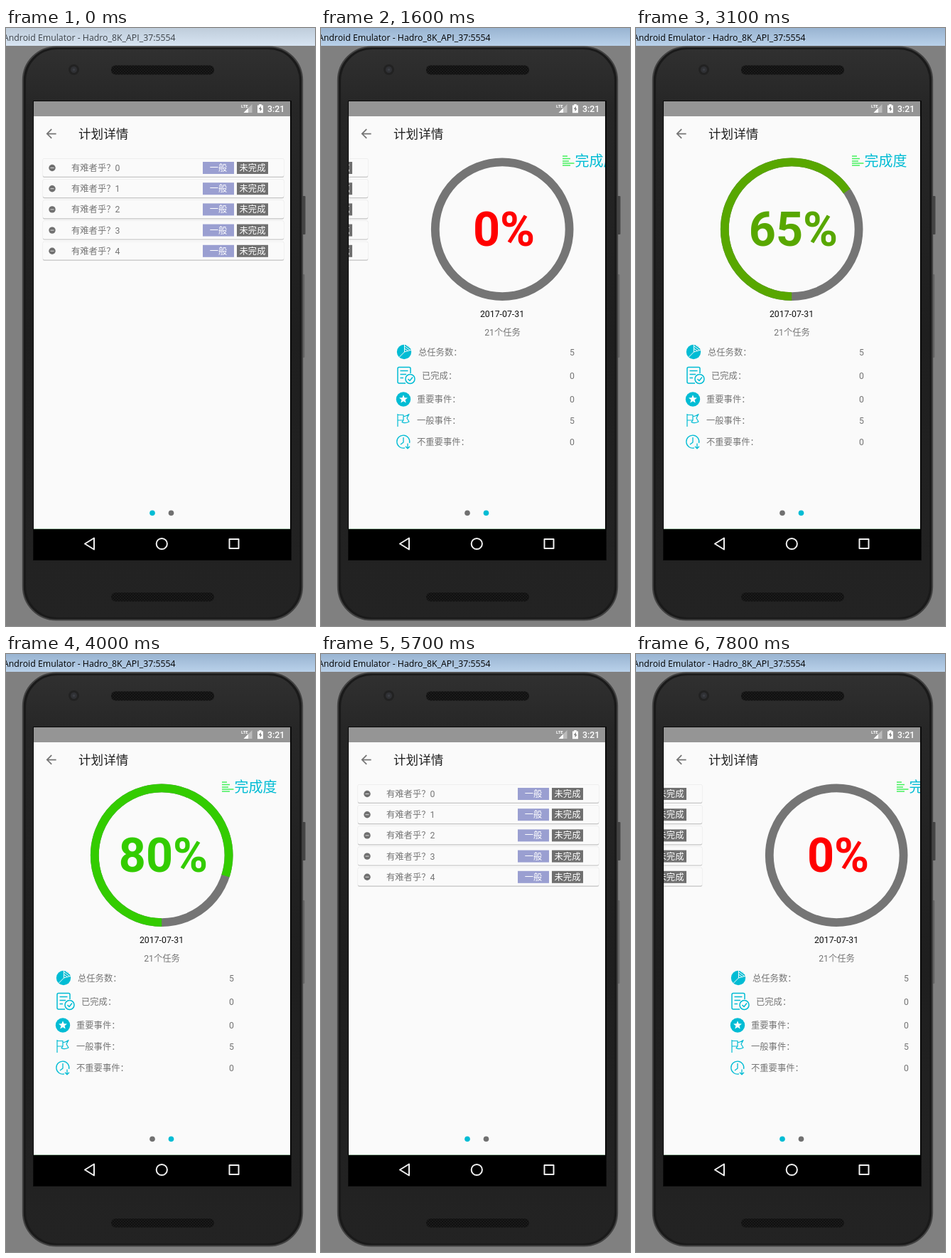
These frames come from a looping animation (435x840 px, 8000 ms). An HTML page:

```html
<!DOCTYPE html>
<html lang="zh-CN">
<head>
<meta charset="utf-8">
<title>计划详情</title>
<style>
  html, body { margin: 0; width: 100%; height: 100%; overflow: hidden; background: #808080; }
  svg { display: block; width: 435px; height: 840px; }
  text { font-family: Roboto, "Noto Sans CJK SC", "Noto Sans CJK", sans-serif; font-size: 12.3px; fill: #757575; white-space: pre; }
  .mid { text-anchor: middle; }
  .white { fill: #fff; }
  .line { fill: none; stroke: #00bcd4; stroke-width: 1.5; stroke-linejoin: round; }
  .nav { fill: none; stroke: #f0f0f0; stroke-width: 2; stroke-linejoin: round; }
</style>
</head>
<body>
<svg viewBox="0 0 435 840">
  <defs>
    <linearGradient id="active" x2="0" y2="1"><stop stop-color="#99b4d1"/><stop offset="1" stop-color="#b9d1ea"/></linearGradient>
    <linearGradient id="inactive" x2="0" y2="1"><stop stop-color="#bfcddb"/><stop offset="1" stop-color="#d7e4f2"/></linearGradient>
    <linearGradient id="shell" x2="0" y2="1">
      <stop stop-color="#303030"/><stop offset=".1" stop-color="#262626"/>
      <stop offset=".5" stop-color="#1e1e1e"/><stop offset="1" stop-color="#232323"/>
    </linearGradient>
    <pattern id="mesh" width="4" height="4" patternUnits="userSpaceOnUse">
      <rect width="4" height="4" fill="#101010"/>
      <circle cx="1" cy="1" r=".8" fill="#262626"/><circle cx="3" cy="3" r=".8" fill="#262626"/>
    </pattern>
    <clipPath id="window"><rect x="39" y="170" width="361" height="500"/></clipPath>
  </defs>

  <!-- window title and phone -->
  <rect id="bar" width="435" height="25"/>
  <text id="caption" x="-4" y="18" style="font:12.3px 'Open Sans','Noto Sans',sans-serif">Android Emulator - Hadro_8K_API_37:5554</text>
  <rect x="416" y="236" width="5.500" height="54" rx="1" fill="#444"/>
  <rect x="416" y="346" width="4.500" height="117" rx="1" fill="#686868"/>
  <rect x="23.800" y="26.500" width="393.400" height="805" rx="47" fill="#1a1a1a" stroke="#424242" stroke-width="2"/>
  <rect x="28" y="30" width="385" height="798" rx="44" fill="url(#shell)"/>
  <rect x="148" y="52.500" width="145" height="13" rx="6" fill="url(#mesh)"/>
  <rect x="148" y="793" width="145" height="12.500" rx="6" fill="url(#mesh)"/>
  <circle cx="95.500" cy="58.500" r="7.500" fill="#222"/>
  <circle cx="95.500" cy="58.500" r="4.500" fill="#303135"/>
  <circle cx="95.500" cy="58.500" r="1.800" fill="#3c3e44"/>

  <!-- screen -->
  <rect x="38" y="102" width="364" height="646" fill="#0a0a0a"/>
  <rect x="39" y="103" width="361" height="21" fill="#959595"/>
  <rect x="39" y="124" width="361" height="580" fill="#fafafa"/>
  <path d="M39 703.500H400" stroke="#a4c2aa"/>
  <rect x="39" y="704" width="362" height="43"/>
  <text class="white" x="331" y="112" style="font-size:6px;font-weight:700">LTE</text>
  <path d="M334.500 119L346.500 107V119Z" fill="#bcbcbc"/>
  <path d="M334.500 119L341 112.500V119Z" fill="#fff"/>
  <path d="M354 108.500H356.300V107H359.700V108.500H362V119.300H354Z" fill="#fff"/>
  <path d="M358.800 109.800L355.800 114H357.600V117.600L360.400 113.200H358.800Z" fill="#808080"/>
  <text class="white" x="368" y="118" style="font-weight:500">3:21</text>
  <path transform="translate(53 138) scale(.88)" fill="#757575" d="M20 11H7.830L13.420 5.410 12 4 4 12 12 20 13.410 18.590 7.830 13H20Z"/>
  <text x="102" y="154.800" style="font-size:17.6px;fill:#212121">计划详情</text>
  <path class="nav" d="M124 716.500V732.500L111 724.500Z"/>
  <circle class="nav" cx="219.300" cy="724.500" r="7.600"/>
  <rect class="nav" x="314.500" y="718" width="13" height="13"/>

  <!-- sliding pages -->
  <g clip-path="url(#window)">
    <g id="list"></g>
    <g id="stats">
      <path d="M304 180H311M304 183.500H315M304 187H313M304 190H320.500M304 193H315" stroke="#44f15c" stroke-width="1.600"/>
      <text x="321.500" y="194" style="font-size:20px;fill:#00bcd4">完成度</text>
      <g fill="none" stroke-width="11.800">
        <circle cx="219.200" cy="282.700" r="94.400" stroke="#757575"/>
        <circle id="arc" cx="219.200" cy="282.700" r="94.400" pathLength="100" transform="rotate(90 219.200 282.700)"/>
      </g>
      <text id="percent" class="mid" x="221.500" y="306" style="font-size:66.5px;font-weight:700"></text>
      <text class="mid" x="219" y="406" style="fill:#111">2017-07-31</text>
      <text class="mid" x="219.500" y="431.500">21个任务</text>

      <circle cx="81" cy="455" r="10.200" fill="#00bcd4"/>
      <path d="M81.500 444V455L73.500 463M81.500 455L91.500 452M82 447L90 453M83.500 445L91 450.500M82 450.500L87 454" stroke="#fafafa" fill="none"/>
      <path class="line" d="M83 499H74Q72 499 72 497V478.500Q72 476.500 74 476.500H88Q90 476.500 90 478.500V485M75.500 481.500H86.500M75.500 486.500H84M75.500 491.500H80"/>
      <circle class="line" cx="89.500" cy="493" r="6.500"/>
      <path class="line" d="M86.500 493L89 495.500 93 490.500"/>
      <circle cx="80" cy="521.500" r="10.200" fill="#00bcd4"/>
      <path id="star" fill="#fff"/>
      <path class="line" style="stroke-width:1.200" d="M72 542V560M72 543.500H80V546Q84 545.500 88 542.500L85 548 88 553Q82 556 78 553.500L80 551H72M80 546V551"/>
      <path class="line" style="stroke-width:1.300" d="M82 589.800A9 9 0 1 1 88.600 583M80 575V582L76 585M86 583.500V590.500M83 587.700L86 590.700 89 587.700"/>
    </g>
  </g>
  <circle id="dot0" cx="206" cy="681.300" r="3.800"/>
  <circle id="dot1" cx="232.500" cy="681.300" r="3.800"/>
</svg>
<script>
const $ = id => document.getElementById(id);
const PAGE = 361, STEP = 100, LOOP = 8000;

$('list').innerHTML = [0, 1, 2, 3, 4].map(i => `<g transform="translate(0 ${i * 29.2})">
  <rect x="51.500" y="183" width="340" height="27" rx="2.500" fill="#e6e6e6"/>
  <rect x="52" y="185" width="339" height="25" rx="2" fill="#c6c6c6"/>
  <rect x="52" y="183.500" width="339" height="25.300" rx="2" fill="#fafafa"/>
  <circle cx="65" cy="196.500" r="4.700" fill="#707070"/>
  <path d="M62.500 196.500H67.500" stroke="#ddd"/>
  <text x="92" y="201">有难者乎？${i}</text>
  <rect x="277" y="188" width="44" height="17" fill="#9a9fd1"/>
  <text class="mid white" x="299" y="201">一般</text>
  <rect x="325" y="188" width="44" height="17" fill="#707070"/>
  <text class="mid white" x="347" y="201">未完成</text>
</g>`).join('');

const rows = [
  ['总任务数：', 101, 459.5, 5], ['已完成：', 106, 493, 0], ['重要事件：', 99, 526, 0],
  ['一般事件：', 99, 556, 5], ['不重要事件：', 99, 586, 0]
];
$('stats').insertAdjacentHTML('beforeend', rows.map(([label, x, y, value]) =>
  `<text x="${x}" y="${y}">${label}</text><text x="314" y="${y}">${value}</text>`).join(''));

$('star').setAttribute('d', 'M' + Array.from({ length: 10 }, (_, i) => {
  const r = i % 2 ? 2.7 : 6.3, a = i * Math.PI / 5;
  return `${80 + r * Math.sin(a)} ${521.5 - r * Math.cos(a)}`;
}).join('L') + 'Z');

// Page offset after each step of a swipe; the last value is held.
const swipes = [
  [0, [0]],
  [1200, [15, 85, 185, 273, 325, 349, 358, PAGE]],
  [5400, [330, 180, 45, 0]],
  [7400, [16, 78, 155, 230, 298]]
];
function pageOffset(t) {
  const [start, offsets] = swipes.filter(s => s[0] <= t).pop();
  return offsets[Math.min((t - start) / STEP, offsets.length - 1)];
}

// Fast-out-slow-in: cubic-bezier(.4, 0, .2, 1)
function ease(x) {
  let low = 0, high = 1;
  for (let i = 0; i < 24; i++) {
    const u = (low + high) / 2, v = 1 - u;
    if (1.2 * v * v * u + .6 * v * u * u + u * u * u < x) low = u; else high = u;
  }
  return x >= 1 ? 1 : low * low * (3 - 2 * low);
}

function render(time) {
  const t = Math.floor(time % LOOP / STEP) * STEP;
  const focused = t >= 900;
  $('bar').setAttribute('fill', focused ? 'url(#active)' : 'url(#inactive)');
  $('caption').style.fill = focused ? '#000' : '#3c4248';

  const offset = pageOffset(t);
  $('list').setAttribute('transform', `translate(${-offset})`);
  $('stats').setAttribute('transform', `translate(${PAGE - offset})`);
  const page = t >= 1500 && t < 5500 ? 1 : 0;
  [0, 1].forEach(i => $('dot' + i).setAttribute('fill', i === page ? '#00bcd4' : '#707070'));

  const value = t < 2200 || t >= 5700 ? 0 : 80 * ease((t - 2060) / 1940);
  const color = `rgb(${Math.round(255 - 2.55 * value)},${Math.round(2.55 * value)},0)`;
  $('arc').setAttribute('stroke', value ? color : 'none');
  $('arc').setAttribute('stroke-dasharray', `${value} 200`);
  $('percent').textContent = Math.floor(value) + '%';
  $('percent').style.fill = color;
}

const begin = performance.now();
(function frame() {
  render(performance.now() - begin);
  requestAnimationFrame(frame);
})();
</script>
</body>
</html>
```
